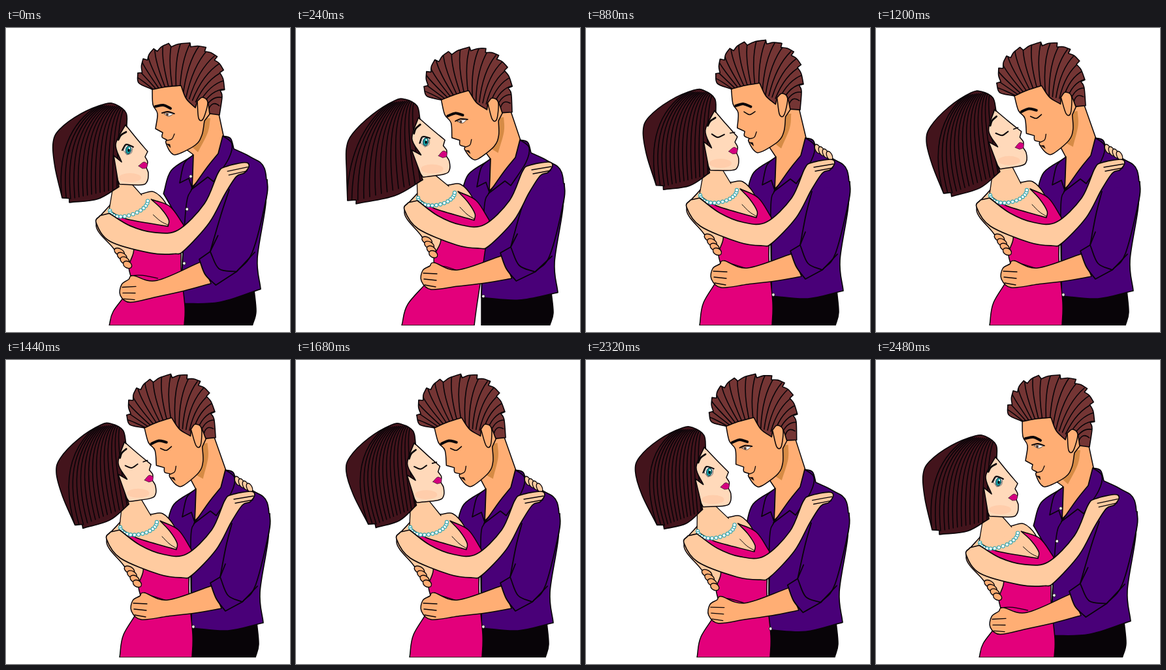
An HTML page with a canvas that plays this animation: 435x465 px, repeating every 2.56 s.

```html
<!DOCTYPE html>
<html lang="en">
<head>
<meta charset="utf-8">
<title>Embrace</title>
<style>
html, body { margin: 0; width: 100%; height: 100%; overflow: hidden; background: #fff; }
canvas { display: block; }
</style>
</head>
<body>
<canvas id="stage" width="435" height="465"></canvas>
<script>
const ctx = document.getElementById('stage').getContext('2d');
const LOOP = 2560, STEP = 80, FLOOR = 455;
const INK = '#080408', SHIRT = '#490078', DRESS = '#e3007b';
const TAN = '#ffae74', TAN_SHADE = '#d68b45', PEACH = '#ffcba0', PEACH_FACE = '#ffd9ba';
const HAIR_M = '#743534', HAIR_W = '#43141c';

// heads: x, y, angle; swing moves the ends of her hair
const far = { low: 1, lean: 0, man: [300, 125, 0], woman: [212, 211, 0], swing: 0 };
const lean = { low: 0, lean: 1, man: [303, 126, -11], woman: [227, 194, -10], swing: -34 };
const near = { low: 0, lean: 0, man: [308, 121, 5], woman: [233, 196, 8], swing: 14 };
const kiss = { low: 0, lean: 0, man: [293, 117, -13], woman: [222, 181, -11], swing: -4 };
const rest = { ...kiss, woman: [216, 188, -6], swing: 22 };
const KEYS = [[0, far], [240, lean], [560, near], [1200, kiss], [2080, rest], [2240, rest], [2480, far], [LOOP, far]];

const clamp = v => Math.max(0, Math.min(1, v));
const ease = u => (1 - Math.cos(Math.PI * u)) / 2;
const rad = deg => deg * Math.PI / 180;
const mix = (a, b, u) => Array.isArray(a) ? a.map((v, i) => mix(v, b[i], u)) : a + (b - a) * u;

function poseAt(t) {
  const i = KEYS.findIndex(k => k[0] > t);
  const [t0, a] = KEYS[i - 1], [t1, b] = KEYS[i];
  const u = ease((t - t0) / (t1 - t0));
  return Object.fromEntries(Object.keys(a).map(k => [k, mix(a[k], b[k], u)]));
}

// his torso hardly moves, his forearm follows her waist
const hisBody = ({ low, lean }) => ([x, y]) => {
  const k = clamp((y - 250) / 90) * clamp((385 - x) / 60), fade = clamp((FLOOR - y) / 60);
  return [x - low * (4 + 13 * k) + lean * 7 * (1 - k),
    y + fade * (low * (15 * k - 3 + Math.max(0, 320 - x) * k / 10) + lean * 3)];
};

// she sinks to the left, or bends to the right above the waist
const herBody = ({ low, lean }) => ([x, y]) => {
  const left = clamp((400 - x) / 230), fade = clamp((FLOOR - y) / 60);
  return [x - low * (8 + 8 * left) + lean * (12 - 24 * ease(clamp((y - 310) / 145))),
    y + fade * (low * (4 + 20 * left ** 1.5) + lean * 4)];
};

function turn(px, py, [x, y, deg]) {
  const c = Math.cos(rad(deg)), s = Math.sin(rad(deg));
  return ([a, b]) => [x + (a - px) * c - (b - py) * s, y + (a - px) * s + (b - py) * c];
}

// "x,y" tokens; "!" marks a corner
const points = (text, map) => text.trim().split(/\s+/).map(k =>
  [...map(k.split(',').map(parseFloat)), k.endsWith('!')]);

function trace(p, closed) {
  const n = p.length, get = i => closed ? p[(i + n) % n] : p[Math.max(0, Math.min(n - 1, i))];
  ctx.beginPath();
  ctx.moveTo(p[0][0], p[0][1]);
  for (let i = 0; i < (closed ? n : n - 1); i++) {
    const a = get(i - 1), b = get(i), c = get(i + 1), d = get(i + 2);
    const out = k => b[k] + (b[2] ? (c[k] - b[k]) / 3 : (c[k] - a[k]) / 6);
    const into = k => c[k] - (c[2] ? (c[k] - b[k]) / 3 : (d[k] - b[k]) / 6);
    ctx.bezierCurveTo(out(0), out(1), into(0), into(1), c[0], c[1]);
  }
}

function shape(p, fill, width = 1.5, closed = true) {
  trace(p, closed);
  if (fill) { ctx.fillStyle = fill; ctx.fill(); }
  if (width) { ctx.lineWidth = width; ctx.strokeStyle = INK; ctx.stroke(); }
}

const line = (text, map, width = 1.3) => shape(points(text, map), null, width, false);

function oval([x, y], rx, ry, fill, deg = 0, width = 0, color = INK) {
  ctx.beginPath();
  ctx.ellipse(x, y, rx, ry, rad(deg), 0, 7);
  ctx.fillStyle = fill;
  ctx.fill();
  if (width) { ctx.lineWidth = width; ctx.strokeStyle = color; ctx.stroke(); }
}

// hair locks, clipped to the shape
function hair(p, fill, count, lock) {
  shape(p, fill, 1.6);
  ctx.save();
  trace(p, true);
  ctx.clip();
  for (let i = 0; i < count; i++) {
    const [a, b, c] = lock(i / (count - 1));
    ctx.beginPath();
    ctx.moveTo(...a);
    ctx.quadraticCurveTo(...b, ...c);
    ctx.stroke();
  }
  ctx.restore();
}

function drawMan(body, head) {
  const b = s => points(s, body), h = s => points(s, head);
  shape(b('284,400! 284,455! 382,455! 387,435 384,400!'), INK);
  shape(b(`291,198! 257,221 246,255! 284,300! 284,410! 340,414 394,402! 389,355 402,270
    400,218 378,200 353,188! 348,172 336,168!`), SHIRT, 1.7);
  shape([...h('324,122!'), ...b('338,172! 325,210 289,246! 290,196!'), ...h('275,185! 300,140!')], TAN);
  shape(h('284,181! 300,163 304,138! 313,138! 309,160 294,190!'), TAN_SHADE, 0);
  shape(b('291,197! 277,210 270,240! 284,233! 289,248! 290,225!'), SHIRT, 1.7);
  shape(b('336,168! 350,180 345,203 322,238! 313,231! 288,250! 312,216 329,195!'), SHIRT, 1.7);
  line('289,248! 283,275 284,408', body, 1.6);
}

function drawFarHand(body) {
  for (let i = 0; i < 4; i++) oval(body([355 + i * 6, 185 + i * 3.5]), 4, 7.5, PEACH, -25, 1.3);
}

function drawWomanBody(body, head, low) {
  const b = s => points(s, body), jaw = points('166,230! 193,239!', head);
  shape(b('177,245! 154,278 180,314 204,347! 262,290! 264,278 257,253 240,235 222,236! 200,240!'), PEACH);
  shape(b(`174,256! 200,272 261,290! 262,280 251,262 236,246! 264,260 284,290! 280,350
    286,420 285,455! 174,455! 180,420 206,375 203,345 210,318 190,290!`), DRESS);
  const base = b('174,254! 200,264! 222,238!');
  shape([jaw[0], ...base, jaw[1]], PEACH, 0);
  shape([jaw[0], base[0]], null, 1.3, false);
  shape([jaw[1], base[2]], null, 1.3, false);
  line('239,270! 250,281 261,288!', body, 1);
  for (let i = 0; i <= 14; i++) {
    const a = Math.PI * i / 14;
    oval(body([203 - 28 * Math.cos(a), 252 - 4 * Math.cos(a) * -1 + 15 * Math.sin(a)]), 2.6, 2.6, '#fff', 0, 1.1, '#35a6ae');
  }
  line('206,359! 224,361 246,368', body, 1.2);
}

function drawButtons(body, low) {
  const spots = low > 0.5 ? [[287, 230], [285, 275], [290, 345]] : [[281, 329], [287, 408]];
  for (const p of spots) oval(body(p), 2.4, 2.4, '#fff', 0, 0.8);
}

function drawArms(his, hers) {
  const b = s => points(s, his);
  for (let i = 0; i < 4; i++) oval(hers([189 + i * 4, 321 + i * 7]), 8.5 - i / 2, 5, TAN, 30, 1.4);
  shape(b(`316,345! 248,367 212,356 205,361! 194,368 192,384 207,397 248,392 290,387 330,380!`), TAN);
  for (let i = 0; i < 3; i++) line(`${195 + i},${372 + i * 9}! ${216 - i},${373 + i * 10}!`, his);
  shape(b(`346,250! 337,285 328,332! 313,341! 322,365 336,384! 362,370! 382,345 403,262 404,235!`), SHIRT, 1.8, false);
  line('336,312! 328,332! 340,360 362,370! 385,346!', his, 1.8);
  shape(points(`174,260! 205,283 240,297 276,297 315,260 335,215 346,206 374,201 381,206 374,217
    362,222 345,248 322,290 285,329 270,333 235,328 175,303 154,274 160,263!`, hers), PEACH, 1.7);
  for (let i = 0; i < 2; i++) line(`${349 + i * 2},${213 + i * 6}! ${379 - i},${208 + i * 6}!`, hers);
}

// a ring of spikes leaning clockwise around the crown
function quiff(head) {
  const rim = (deg, r) => {
    const bulge = v => Math.sign(v) * Math.abs(v) ** 0.85;
    return head([268 + 64 * r * bulge(Math.cos(rad(deg))), 84 + 59 * r * bulge(Math.sin(rad(deg)))]);
  };
  const p = [];
  for (let a = 172; a < 370; a += 22) {
    p.push([...rim(a + 8, 1.01), false], [...rim(a + 19, 1.05), true], [...rim(a + 21, 0.95), true]);
  }
  return p;
}

function drawManHead(head, closed) {
  const h = s => points(s, head);
  shape(h(`224,93! 225,117 232,131 229,154! 240,160! 239,167 246,171! 245,176 253,191
    263,193 290,179 300,164 304,142! 325,115! 268,86!`), TAN);
  const outline = [...quiff(head), ...h('331,105 327,133! 312,131! 308,113 293,112! 290,122! 276,108 268,88! 245,90 224,94!')];
  hair(outline, HAIR_M, 19, u => {
    const a = rad(178 + 212 * u), start = [222 + 88 * u, 95 + 30 * u * u];
    const end = [266 + 70 * Math.cos(a), 86 + 66 * Math.sin(a)];
    return [start, [(start[0] + end[0]) / 2 - 12 + 10 * u, (start[1] + end[1]) / 2 - 12], end].map(head);
  });
  shape(h('293,112! 301,106 309,114 302,139 295,138'), TAN);
  line('229,120! 241,118 252,123!', head, 4);
  if (closed) line('241,130! 249,135 258,131!', head, 1.6);
  else {
    shape(h('242,131! 250,130 257,131! 249,135'), '#fff', 0.6);
    oval(head([247, 132.5]), 2, 2, '#53413b');
    line('239,130! 248,128 258,131!', head, 1.8);
  }
  line('246,172! 254,170 258,162!', head);
  shape(h('246,177! 251,178! 252,183!'), INK, 0.5);
}

function drawWomanHead(head, swing, closed) {
  const h = s => points(s, head);
  const sway = ([x, y]) => {
    const w = clamp((y - 115) / 147) ** 2 * clamp((173 - x) / 83);
    const [a, b] = head([x, y]);
    return [a + swing * w, b + 2 * w];
  };
  shape(h(`183,148! 200,169 217,189! 213,197! 217,205 215,213 218,222 216,235 207,240
    174,239! 160,205 168,160!`), PEACH_FACE);
  oval(head([190, 229]), 17, 7, '#ffcdab');
  const outline = points(`185,151! 184,130 168,117 152,116 115,131 82,155 72,176 75,212 86,258!
    97,259! 97,265! 140,261 173,243! 165,195! 177,205! 168,178 183,148!`, sway);
  hair(outline, HAIR_W, 14, u => [
    [182 - 40 * u, 121 - 3 * u],
    [170 - 96 * u, 135 + 24 * u],
    [170 - 84 * u, 246 + 16 * u]
  ].map(sway));
  line('172,171! 176,164 184,159!', head, 2.8);
  if (closed) {
    line('178,184! 187,189 197,185!', head, 2);
    line('206,183! 213,182!', head, 1.6);
  } else {
    shape(h('180,187! 185,179 194,182! 192,191 185,194!'), '#fff', 0.6);
    oval(head([187.5, 186.5]), 4.2, 6.2, '#159ca2', 10, 0.8);
    oval(head([188, 187]), 1.7, 2.6, INK);
    oval(head([189, 184]), 1.2, 1.4, '#fff');
    line('178,187! 184,178 195,182!', head, 2);
  }
  shape(h('203,211! 211,205 217,208! 215,214 209,215!'), '#d4007f', 0.6);
}

function draw(t) {
  const pose = poseAt(t), his = hisBody(pose), hers = herBody(pose);
  const man = turn(300, 125, pose.man), woman = turn(212, 211, pose.woman);
  const closed = t >= 800 && t < 2320;
  const tilt = 0.045 * Math.sin(Math.PI * clamp((t - 240) / 320));
  ctx.setTransform(1, 0, 0, 1, 0, 0);
  ctx.fillStyle = '#fff';
  ctx.fillRect(0, 0, 435, 465);
  ctx.save();
  ctx.beginPath();
  ctx.rect(0, 0, 435, FLOOR);
  ctx.clip();
  ctx.transform(1, 0, -tilt, 1, FLOOR * tilt, 0);
  ctx.lineJoin = ctx.lineCap = 'round';
  drawMan(his, man);
  if (t >= 480 && t < 2320) drawFarHand(his);
  drawWomanBody(hers, woman);
  drawButtons(his, pose.low);
  drawArms(his, hers);
  drawWomanHead(woman, pose.swing, closed);
  drawManHead(man, closed);
  ctx.restore();
}

function frame() {
  draw(Math.floor(performance.now() % LOOP / STEP) * STEP);
  requestAnimationFrame(frame);
}
frame();
</script>
</body>
</html>
```
